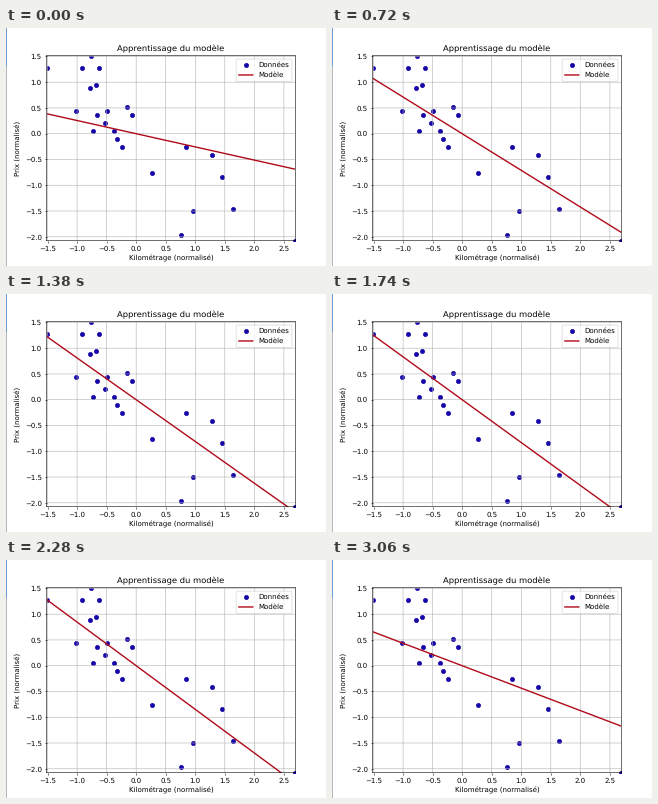
A matplotlib script that plays this animation: 320x238 px, repeating every 3090 ms.

```python
import numpy as np
import matplotlib.pyplot as plt
from matplotlib.animation import FuncAnimation
from matplotlib.patches import Rectangle

W, H, DPI = 320, 238, 50
STEP_MS, LOOP_MS, RESET_MS = 30, 3090, 2700
BLUE, RED = "#1606a8", "#b00a1a"
BOX = dict(left=40.6, right=289.4, top=27.6, bottom=212.7)

# Soft, unsnapped strokes and glyphs
plt.rcParams.update({"path.snap": False, "text.hinting": "none"})

# Observed cars: mileage (thousands of km) and price
km = [240, 139.8, 150.5, 185.5, 176, 114.8, 166.8, 89, 144.5, 84, 82, 63,
      74, 97.5, 67, 76, 48.2, 93, 61, 65.7, 54, 68.5, 22.9, 61.8]
price = [3650, 3800, 4400, 4450, 5250, 5350, 5800, 5990, 6000, 6200, 6390, 6390,
         6600, 6800, 6800, 6900, 6900, 6990, 7490, 7555, 7990, 7990, 7990, 8290]


def normalise(values):
    v = np.array(values)
    return (v - v.mean()) / v.std()


x, y = normalise(km), normalise(price)
best = np.mean(x * y)
DECAY = 0.915  # share of the slope error left after one descent step
PAUSES = [(30, 150), (150, 300), (720, 840), (1200, 1380), (1590, 1740), (1950, 2100)]


def iteration(t):
    """Descent step on screen at t ms; training restarts at RESET_MS."""
    if t >= RESET_MS:
        return round((t - RESET_MS) / 45)
    for start, end in PAUSES:
        if start <= t < end:
            t = start
    return round(np.interp(t, [0, 300, RESET_MS], [4, 12, 59]))


def slope(t):
    return best * (1 - DECAY ** iteration(t))


fig = plt.figure(figsize=(W / DPI, H / DPI), dpi=DPI, facecolor="white")
ax = fig.add_axes([BOX["left"] / W, 1 - BOX["bottom"] / H,
                   (BOX["right"] - BOX["left"]) / W,
                   (BOX["bottom"] - BOX["top"]) / H])
ax.scatter(x, y, color=BLUE, label="Données")
ends = np.array([x.min(), x.max()])
model, = ax.plot(ends, slope(0) * ends, color=RED, lw=2, label="Modèle")

ax.set_xlim(x.min(), x.max())
ax.set_ylim(y.min(), y.max())
ax.set_xticks(np.arange(-1.5, 2.6, 0.5))
ax.set_yticks(np.arange(-2, 1.6, 0.5))
ax.set_title("Apprentissage du modèle")
ax.set_xlabel("Kilométrage (normalisé)")
ax.set_ylabel("Prix (normalisé)")
ax.grid(True)
ax.legend(loc="upper right")

# Thin window edge on the left
for top, bottom, color in [(0, 38, "#6f9fd8"), (38, H, "#b4b8be")]:
    fig.add_artist(Rectangle((0, 1 - bottom / H), 1 / W, (bottom - top) / H,
                             color=color, lw=0))


def update(i):
    model.set_ydata(slope(i * STEP_MS) * ends)
    return model,


anim = FuncAnimation(fig, update, frames=LOOP_MS // STEP_MS, interval=STEP_MS,
                     repeat=True, repeat_delay=0)
plt.show()
```
